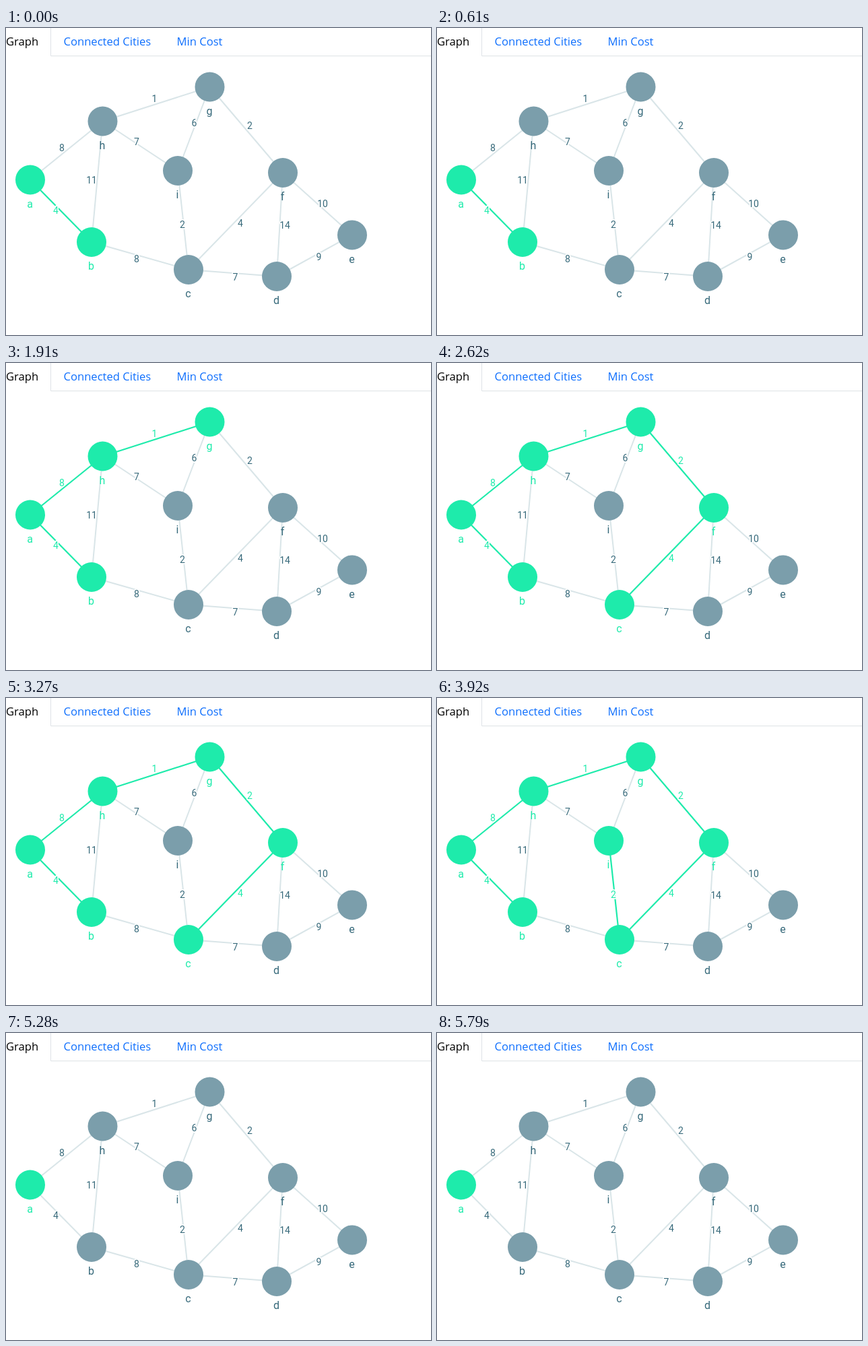
An HTML page that plays this animation: 631x456 px, repeating every 5840 ms.

```html
<!DOCTYPE html>
<html lang="en">
<head>
<meta charset="utf-8">
<title>Minimum spanning tree</title>
<style>
  html, body { margin: 0; width: 100%; height: 100%; overflow: hidden; background: #fff; }
  svg { display: block; }
  .tab { font: 16.6px "Open Sans", "Noto Sans", sans-serif; fill: #0d6efd; }
  .tab.active { fill: #000; }
  .border { fill: none; stroke: #dee2e6; }
  .label { font-family: Roboto, Arial, sans-serif; text-anchor: middle; fill: #36697a; }
  .name { font-size: 16px; }
  .cost { font-size: 14px; stroke: #fff; stroke-width: 3.5px; paint-order: stroke; stroke-linejoin: round; }
  line { stroke: #d9e5e8; stroke-width: 2; }
  circle { fill: #7b9eab; }
  .lit line { stroke: #1eebab; stroke-width: 2.2; }
  .lit circle, .lit .label { fill: #1eebab; }
</style>
</head>
<body>
<svg width="631" height="456" viewBox="0 0 631 456">
  <path class="border" d="M66.5 0V41.5H631"/>
  <text class="tab active" x="0" y="26">Graph</text>
  <text class="tab" x="85.5" y="26">Connected Cities</text>
  <text class="tab" x="253.5" y="26">Min Cost</text>
</svg>
<script>
const LOOP = 5840;
const RESET = 5270;
const RADIUS = 22;

// Centre of each node
const nodes = {
  a: [36, 225.5], b: [127, 318], c: [271, 359],
  d: [402, 369], e: [514, 307.5], f: [411, 215],
  g: [302.5, 87.5], h: [143.5, 138.5], i: [255, 212]
};

// Ends, cost, centre of the cost label
const edges = [
  ['ab', 4, 74, 271], ['ah', 8, 83, 178], ['hb', 11, 127, 226],
  ['hg', 1, 220.5, 104.5], ['hi', 7, 194, 168.5], ['gi', 6, 279.5, 141],
  ['gf', 2, 362, 144.5], ['ic', 2, 262, 292], ['bc', 8, 194, 343],
  ['fc', 4, 348, 289.5], ['fd', 14, 414, 293], ['fe', 10, 470, 261],
  ['cd', 7, 340.5, 369.5], ['de', 9, 464.5, 340]
];

// Time at which an edge and its new node join the tree
const joins = [
  [0, 'ab', 'b'], [650, 'ah', 'h'], [1320, 'hg', 'g'], [1960, 'gf', 'f'],
  [2620, 'fc', 'c'], [3290, 'ic', 'i'], [3970, 'cd', 'd'], [4620, 'de', 'e']
];

const svg = document.querySelector('svg');
const groups = {};

function add(parent, tag, attrs, text = '') {
  const el = document.createElementNS(svg.namespaceURI, tag);
  for (const key in attrs) el.setAttribute(key, attrs[key]);
  el.textContent = text;
  return parent.appendChild(el);
}

for (const [id, cost, x, y] of edges) {
  const [x1, y1] = nodes[id[0]];
  const [x2, y2] = nodes[id[1]];
  const group = groups[id] = add(svg, 'g', {});
  add(group, 'line', { x1, y1, x2, y2 });
  add(group, 'text', { class: 'label cost', x, y: y + 5 }, cost);
}

for (const id in nodes) {
  const [cx, cy] = nodes[id];
  const group = groups[id] = add(svg, 'g', {});
  add(group, 'circle', { cx, cy, r: RADIUS });
  add(group, 'text', { class: 'label name', x: cx - 0.5, y: cy + 41 }, id);
}
groups.a.classList.add('lit');

const start = performance.now();

function draw(now) {
  const t = Math.max(0, now - start) % LOOP;
  for (const [time, edge, node] of joins) {
    const lit = t >= time && t < RESET;
    groups[edge].classList.toggle('lit', lit);
    groups[node].classList.toggle('lit', lit);
  }
  requestAnimationFrame(draw);
}
draw(start);
</script>
</body>
</html>
```
